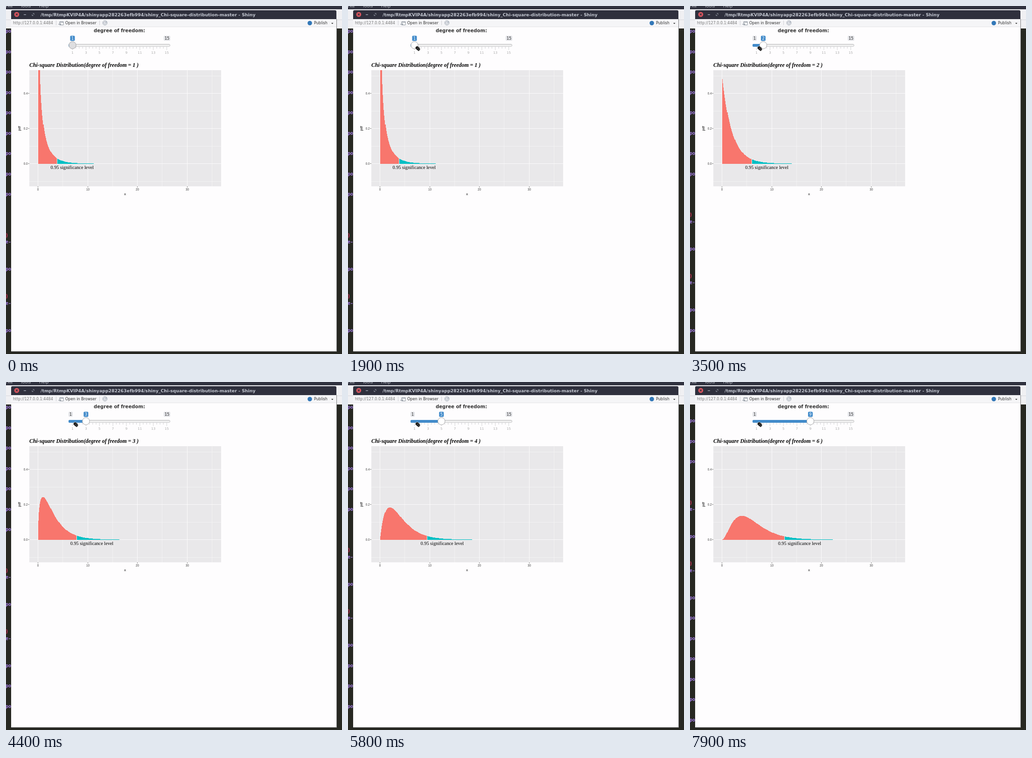
Recreate the animation shown at these times as an HTML page. Size 720 px wide and 743 px high, loop 8 s.

```html
<!DOCTYPE html>
<html lang="en">
<head>
<meta charset="utf-8">
<title>Chi-square distribution</title>
<style>
  html, body { margin: 0; width: 100%; height: 100%; overflow: hidden; background: #272822; }
  svg { display: block; width: 720px; height: 743px; }
  text { white-space: pre; }
  .ui { font-family: "DejaVu Sans", sans-serif; font-size: 8px; fill: #333; }
  .bold { font-weight: bold; }
  .mid { text-anchor: middle; }
  .tick { font-size: 7px; fill: #aaa; }
  .axis { font: 6.3px "Liberation Sans", Arial, sans-serif; fill: #3c3c3c; }
  .name { font-size: 7.3px; fill: #000; }
  .serif { font-family: "Liberation Serif", "Times New Roman", serif; fill: #000; }
  .code { font: bold 10px "DejaVu Sans Mono", monospace; fill: #a17ce0; }
  .paren { fill: #e0335f; }
</style>
</head>
<body>
<svg viewBox="0 0 720 743">
  <defs>
    <linearGradient id="track" x1="0" y1="0" x2="0" y2="1">
      <stop offset="0" stop-color="#dcdcdc"/><stop offset="1" stop-color="#fff"/>
    </linearGradient>
    <clipPath id="panel"><rect x="50" y="137" width="411" height="248"/></clipPath>
    <clipPath id="strip"><rect y="48" width="11" height="695"/></clipPath>
  </defs>

  <!-- desktop behind the window -->
  <rect width="720" height="743" fill="#272822"/>
  <rect width="720" height="7" fill="#30323f"/>
  <rect y="7" width="720" height="41" fill="#f0f0f3"/>
  <path d="M0 29.500H720" stroke="#d6d7dc"/>
  <g class="ui" style="fill:#c3c7d0;font-size:9px">
    <text x="-5" y="2.5">orke</text><text x="31" y="2.5">Tools</text><text x="71" y="2.5">Help</text>
  </g>
  <g id="log" class="code" clip-path="url(#strip)"></g>

  <!-- window -->
  <rect x="11" y="28" width="698" height="710" fill="#7d7d80"/>
  <rect x="11" y="28" width="697" height="709" fill="#fefdfe"/>
  <path d="M11 28V12a3 3 0 0 1 3-3H705a3 3 0 0 1 3 3V28Z" fill="#2f303d"/>
  <circle cx="23" cy="18" r="5.3" fill="#d9555f"/>
  <path d="M21 16l4 4m0-4l-4 4" stroke="#33303a" stroke-width="1.2"/>
  <path d="M38 18.5h5" stroke="#aeb3bf" stroke-width="1.2"/>
  <path d="M56 20.500v-2.500m0 2.500h2.500M60 16v2.500M60 16h-2.500" stroke="#9da2ae" fill="none"/>
  <text class="ui bold" x="74" y="22" style="font-size:9.36px;fill:#c3c7d1">/tmp/RtmpKVIP4A/shinyapp282263efb994/shiny_Chi-square-distribution-master - Shiny</text>

  <!-- toolbar -->
  <rect x="11" y="28" width="697" height="16" fill="#f5f5f7"/>
  <path d="M11 44.500H708" stroke="#e4e4e8"/>
  <path d="M107.500 31v10M200.500 31v10" stroke="#d0d0d4"/>
  <g class="ui">
    <text x="15" y="39" style="fill:#777">http://127.0.0.1:4484</text>
    <text x="127" y="39" style="font-size:8.08px">Open in Browser</text>
    <text x="660" y="39" style="font-size:8.1px">Publish</text>
  </g>
  <path d="M115 33.500h8v7h-8zM115 35h8" fill="#fff" stroke="#8c939d"/>
  <path d="M112 39h6m-2-2l2 2l-2 2" fill="none" stroke="#87909a"/>
  <circle cx="212" cy="36" r="4.8" fill="none" stroke="#9aa2ad"/>
  <path d="M214.500 36a2.500 2.500 0 1 1-1-2m1.500-1.500v2.500h-2.500" fill="none" stroke="#8793a3"/>
  <circle cx="651" cy="36.500" r="4.8" fill="#3378b8"/>
  <path d="M697 36h4.500l-2.250 2.500z" fill="#333"/>

  <!-- slider -->
  <text class="ui bold" x="188" y="56" style="font-size:10.08px">degree of freedom:</text>
  <g id="scale"></g>
  <rect x="134.500" y="81.500" width="217" height="5" rx="2.500" fill="url(#track)" stroke="#c4c4c6"/>
  <rect id="bar" x="134" y="81" height="6" rx="2" fill="#428bca"/>
  <g id="minTag">
    <rect x="134" y="63.500" width="9" height="10.500" rx="2" fill="#e1e2e6"/>
    <text class="ui mid" x="138.500" y="72">1</text>
  </g>
  <rect x="338" y="63.500" width="14" height="10.500" rx="2" fill="#e1e2e6"/>
  <text class="ui mid" x="345" y="72">15</text>
  <g id="grip">
    <rect x="-5" y="63.500" width="10" height="11" rx="2" fill="#428bca"/>
    <text id="value" class="ui mid" y="72" style="fill:#fff"></text>
    <circle id="knob" cy="83.700" r="7.700" stroke="#a6a6a8"/>
  </g>

  <!-- plot -->
  <text id="heading" class="serif" x="50" y="130" style="font-size:11.83px;font-weight:bold;font-style:italic"></text>
  <rect x="50" y="137" width="411" height="248" fill="#e9e8ea"/>
  <g id="grid"></g>
  <g clip-path="url(#panel)" shape-rendering="crispEdges">
    <path id="body" fill="#f8766d"/>
    <path id="tail" fill="#00bfc4"/>
  </g>
  <text id="note" class="serif mid" y="348" style="font-size:10.25px">0.95 significance level</text>
  <text class="axis name mid" x="255" y="404">x</text>
  <text class="axis name mid" transform="translate(31 261.500) rotate(-90)">pdf</text>

  <g id="cursor">
    <path d="M0 5L1.500 1.500L5 .5L10 4.500L10.800 8L7.500 11.500L3.500 9Z" fill="#1c1c1c" stroke="#fff" stroke-width=".5"/>
    <path d="M3 7.500L7.500 3M5.500 9.500L10 5" stroke="#fff" stroke-width=".7" stroke-dasharray="1 1"/>
  </g>
</svg>
<script>
const LOOP = 8000;
const $ = id => document.getElementById(id);
const X = x => 68.5 + 10.65 * x;
const Y = y => 336.5 - 375 * y;
const slot = v => 142.5 + 14.43 * (v - 1);
const crisp = v => Math.floor(v) + 0.5;

// when each value takes effect
const sliderTimes = [2900, 3700, 4700, 5600, 6500, 7300, 7600, 7800];
const plotTimes = [3500, 4400, 5300, 6200, 7100];
const logTimes = [3100, 4000, 4900, 5900, 6700, 7700];
const critical = [3.84, 5.99, 7.81, 9.49, 11.07, 12.59];
const ends = [11.2, 14, 16.4, 18.5, 20.4, 22.3];

const passed = (times, t) => times.filter(s => t >= s).length;

function buildScale() {
  let out = "";
  for (let i = 0; i <= 28; i++) {
    const x = slot(1 + i / 2), major = i % 4 === 0;
    out += `<path d="M${x} 87v${major ? 7 : 4}" stroke="#cacacc" stroke-width=".8"/>`;
    if (major) out += `<text class="ui tick mid" x="${x}" y="101.500">${1 + i / 2}</text>`;
  }
  $("scale").innerHTML = out;
}

function buildGrid() {
  const line = (d, w) => `<path d="${d}" stroke="#fbfafb" stroke-width="${w}"/>`;
  let out = "";
  for (let v = 0; v <= 35; v += 5) {
    const x = crisp(X(v)), major = v % 10 === 0;
    out += line(`M${x} 137V385`, major ? 1 : 0.5);
    if (major) {
      out += `<path d="M${x} 385v2.500" stroke="#555" stroke-width=".8"/>` +
        `<text class="axis mid" x="${x}" y="394">${v}</text>`;
    }
  }
  for (let i = -1; i <= 5; i++) {
    const y = crisp(Y(i / 10)), major = i % 2 === 0;
    out += line(`M50 ${y}H461`, major ? 1 : 0.5);
    if (major) {
      out += `<path d="M47.500 ${y}h2.500" stroke="#555" stroke-width=".8"/>` +
        `<text class="axis" text-anchor="end" x="46.500" y="${y + 2.2}">${(i / 10).toFixed(1)}</text>`;
    }
  }
  $("grid").innerHTML = out;
}

const gammaHalf = k => k === 1 ? Math.sqrt(Math.PI) : k === 2 ? 1 : (k / 2 - 1) * gammaHalf(k - 2);
const pdf = (x, k) => x ** (k / 2 - 1) * Math.exp(-x / 2) / (2 ** (k / 2) * gammaHalf(k));

// thin bars from a to b under the density
function bars(a, b, k) {
  const base = Y(0) + 0.5;
  let d = `M${X(a)} ${base}`;
  for (let x = a; x < b - 0.01; x += 0.1) {
    const top = Math.min(Y(pdf(x + 0.05, k)), base - 1);
    d += `V${top.toFixed(2)}H${X(Math.min(x + 0.1, b)).toFixed(2)}`;
  }
  return d + `V${base}Z`;
}

function drawPlot(k) {
  const cut = critical[k - 1];
  $("heading").textContent = `Chi-square Distribution(degree of freedom = ${k} )`;
  $("body").setAttribute("d", bars(0.03, cut - 0.05, k));
  $("tail").setAttribute("d", bars(cut + 0.05, ends[k - 1], k));
  $("note").setAttribute("x", X(cut) + 32.3);
}

// console behind the window, scrolled up by whole lines
function drawLog(lines) {
  const top = 489 - 14.5 * lines;
  const row = (s, y, cls = "") => `<text class="${cls}" x="-1" y="${y + 3.5}">${s}</text>`;
  let out = row(")", top, "paren") + row("e-", top + 14.5) + row("po", top + 72.5) +
    row(")", top + 130.5, "paren") + row("e-", top + 145);
  for (let y = top - 87.5; y > 40; y -= 43.5) out += row("po", y);
  for (let y = top + 203; y < 725; y += 43.5) out += row("po", y);
  $("log").innerHTML = out;
}

function drawSlider(v, hover) {
  const x = slot(v);
  $("bar").setAttribute("width", x - 134);
  $("grip").setAttribute("transform", `translate(${x})`);
  $("value").textContent = v;
  $("minTag").style.display = v > 1 ? "" : "none";
  $("knob").setAttribute("fill", hover ? "#fff" : "#dedee0");
}

function drawCursor(t) {
  const step = Math.floor(t / 100);
  const p = Math.min(1, Math.max(0, (step - 8) / 8));
  const [x, y] = t < 600 ? [480, 106] : t < 700 ? [450, 97] : [421 - 277 * p, 88 - 3 * p];
  $("cursor").style.display = t < 200 ? "none" : "";
  $("cursor").setAttribute("transform", `translate(${x} ${y})`);
}

let shown = "";
function render(t) {
  const plot = passed(plotTimes, t), value = 1 + passed(sliderTimes, t);
  const lines = passed(logTimes, t) + 2 * plot;
  const key = [plot, lines].join();
  if (key !== shown) {
    drawPlot(plot + 1);
    drawLog(lines);
    shown = key;
  }
  drawSlider(value, t >= 1500);
  drawCursor(t);
}

buildScale();
buildGrid();
const start = performance.now();
function frame() {
  render((performance.now() - start) % LOOP);
  requestAnimationFrame(frame);
}
frame();
</script>
</body>
</html>
```
